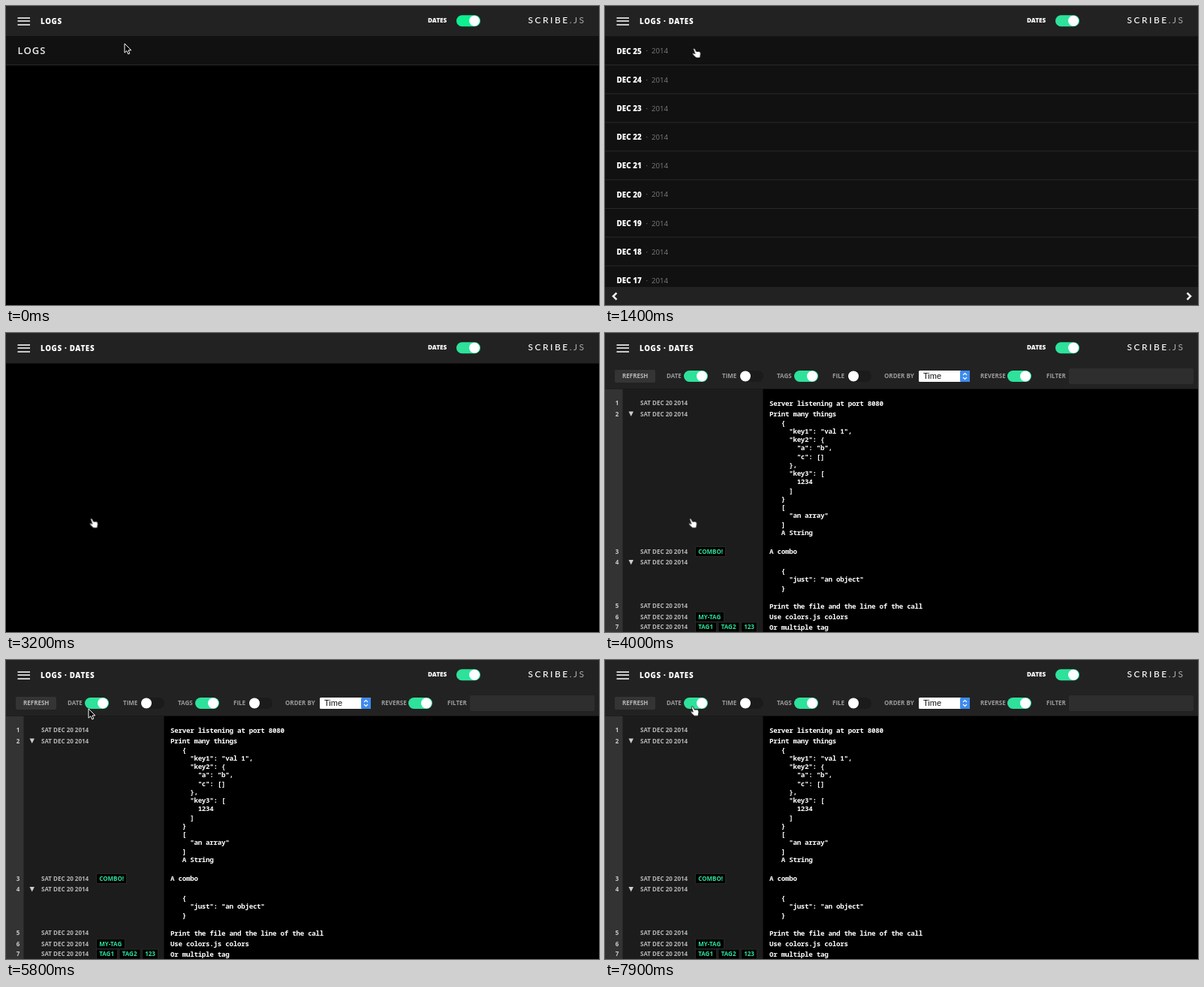
Write an HTML page that moves like this. It is 790 px wide and 398 px high and loops after 8000 ms.

```html
<!DOCTYPE html>
<html lang="en">
<head>
<meta charset="utf-8">
<title>Scribe.js log viewer</title>
<style>
  html, body { margin: 0; width: 100%; height: 100%; overflow: hidden; background: #000; }
  svg { display: block; width: 790px; height: 398px; }
  text { font: 700 8px "Open Sans", "Noto Sans", sans-serif; fill: #9b9b9b; white-space: pre; }
  .title { font-weight: 800; font-size: 9.8px; letter-spacing: .65px; fill: #fff; }
  .switch { font-weight: 800; font-size: 8.2px; fill: #fff; }
  .folder { font-weight: 600; font-size: 13px; letter-spacing: 1.1px; fill: #eee; }
  .day { font-weight: 800; font-size: 9.9px; fill: #fff; }
  .year { font-weight: 400; font-size: 9.7px; fill: #7c7c7c; }
  .brand { font: 500 12px Lato, sans-serif; letter-spacing: 2.5px; fill: #fff; }
  .thin { font-weight: 400; fill: #aaa; }
  .code text { font: 600 9.2px "Noto Sans Mono", monospace; letter-spacing: -.28px; fill: #fff; }
  .num { text-anchor: middle; fill: #ccc; }
  .date { fill: #b4b4b4; }
  .tag text { fill: #2ee29b; }
  .tag rect { fill: #000; stroke: #262626; }
  .option { font: 400 11px "Liberation Sans", Arial, sans-serif; fill: #111; }
  .on { fill: #2ee29b; }
  .off { fill: #1b1b1b; }
  .white { fill: #fff; }
  .panel { fill: #222; }
  .row { fill: #111; }
  .rule { fill: #292929; }
  .chevron { fill: none; stroke: #eee; stroke-width: 2.6; }

  .folders, .dates, .log, .short, .long, .bar, .arrow, .hand, .main-pill,
  .side, .code, .when, .later { animation: 8s step-end infinite; }
  .folders, .short { animation-name: folders; }
  .long { animation-name: long; }
  .dates { animation-name: dates; }
  .log { animation-name: log; }
  .bar { animation-name: bar; }
  .arrow { animation-name: arrow; }
  .hand { animation-name: hand; }
  .main-pill { animation-name: main-pill; }
  .side, .code { animation-name: left; }
  .when { animation-name: when; }
  .later { animation-name: up; }
  .cursor { animation: move 8s infinite; }
  .live circle { animation: knob 8s infinite; }
  .live rect { animation: pill 8s infinite; }

  @keyframes folders { 0% { opacity: 1 } 13.75%, to { opacity: 0 } }
  @keyframes long { 0% { opacity: 0 } 13.75%, to { opacity: 1 } }
  @keyframes dates { 0% { opacity: 0 } 15% { opacity: 1 } 40%, to { opacity: 0 } }
  @keyframes log { 0% { opacity: 0 } 41.25%, to { opacity: 1 } }
  @keyframes main-pill { 0% { fill: #0eef8f } 13.75%, to { fill: #2ee29b } }
  @keyframes arrow { 0%, 51.25% { opacity: 1 } 10%, 77.5%, to { opacity: 0 } }
  @keyframes hand { 0%, 51.25% { opacity: 0 } 10%, 77.5%, to { opacity: 1 } }
  @keyframes bar {
    0%, 13.75% { opacity: 0; transform: none }
    10%, 18.75% { opacity: 1; transform: none }
    21.25% { opacity: 1; transform: translateY(38.2px) }
    22.5% { opacity: 1; transform: translateY(114.6px) }
    23.75% { opacity: 1; transform: translateY(152.8px) }
    25%, 31.25% { opacity: 1; transform: translateY(191px) }
    26.25%, 30% { opacity: 1; transform: translateY(229.2px) }
    27.5% { opacity: 1; transform: translateY(267.4px) }
    40%, to { opacity: 0; transform: none }
  }
  /* date column folded away between 6.6 s and 7.6 s */
  @keyframes left { 0%, 95%, to { transform: none } 82.5% { transform: translateX(-72px) } }
  @keyframes when { 0%, 95%, to { opacity: 1 } 82.5% { opacity: 0 } }
  @keyframes up { 0%, 95%, to { transform: none } 82.5% { transform: translateY(-1px) } }
  @keyframes knob {
    0%, 98.75%, to { transform: none }
    82.5% { transform: none; animation-timing-function: steps(3) }
    86.25% { transform: translateX(-16px) }
    95% { transform: translateX(-16px); animation-timing-function: steps(3) }
  }
  @keyframes pill {
    0%, 98.75%, to { fill: #2ee29b }
    82.5% { fill: #2ee29b; animation-timing-function: steps(3) }
    86.25% { fill: #1b1b1b }
    95% { fill: #1b1b1b; animation-timing-function: steps(3) }
  }
  @keyframes move {
    0% { transform: translate(158px, 50px) }
    8.75% { transform: translate(158px, 50px); animation-timing-function: steps(5) }
    15%, 17.5% { transform: translate(117.5px, 56px); animation-timing-function: steps(2) }
    20% { transform: translate(117px, 64px); animation-timing-function: steps(6) }
    27.5% { transform: translate(115px, 340px); animation-timing-function: steps(3) }
    31.25% { transform: translate(116px, 255px); animation-timing-function: steps(5) }
    37.5% { transform: translate(112.5px, 246.5px) }
    50% { transform: translate(112.5px, 246.5px); animation-timing-function: steps(5) }
    56.25% { transform: translate(70px, 147px); animation-timing-function: steps(7) }
    65% { transform: translate(35px, 112px) }
    66.25% { transform: translate(35px, 112px); animation-timing-function: steps(5) }
    72.5% { transform: translate(110px, 65px); animation-timing-function: steps(4) }
    77.5%, to { transform: translate(115px, 61.5px) }
  }
</style>
</head>
<body>
<svg id="stage" viewBox="0 0 790 398"></svg>
<script>
const text = (x, y, s, cls = "") => `<text class="${cls}" x="${x}" y="${y}" dy=".357em">${s}</text>`;
const rect = (x, y, w, h, cls, r = 0) =>
  `<rect class="${cls}" x="${x}" y="${y}" width="${w}" height="${h}" rx="${r}"/>`;
const group = (cls, ...parts) => `<g class="${cls}">${parts.join("")}</g>`;

const toggle = (x, y, on, cls = "", pill = "") => group(cls,
  rect(x, y - 7.5, 32, 15, pill || (on ? "on" : "off"), 7.5),
  `<circle class="white" cx="${x + (on ? 24 : 8)}" cy="${y}" r="7"/>`);

const header = [
  rect(0, 0, 790, 40.5, "panel"),
  ...[15, 19, 24].map(y => `<rect x="15.5" y="${y}" width="16.5" height="2" fill="#ccc"/>`),
  text(46, 20.5, "LOGS", "title short"),
  text(46, 20.5, "LOGS · DATES", "title long"),
  text(562, 19.5, "DATES", "switch"),
  toggle(600, 19.8, true, "", "main-pill"),
  text(695.5, 19, 'SCRIBE<tspan class="thin">.JS</tspan>', "brand")
].join("");

const folders = group("folders",
  rect(0, 41, 790, 37, "row"), rect(0, 78, 790, 1, "rule"),
  text(15.5, 59, "LOGS", "folder"));

const days = Array.from({ length: 9 }, (_, i) => {
  const y = 41 + 38.2 * i;
  return rect(0, y + 37, 790, 1, "rule") +
    text(15.5, y + 19, `DEC ${25 - i}`, "day") +
    text(54.5, y + 19, "·", "year") + text(62, y + 19, "2014", "year");
});
const dates = group("dates",
  rect(0, 40.5, 790, 340, "row"), ...days,
  rect(0, 374, 790, 24, "panel"),
  '<path class="chevron" d="M15.5 381.8L11 386.3L15.5 390.8M775.5 381.8L780 386.3L775.5 390.8"/>');

const tools = [
  rect(0, 40, 790, 34.5, "panel"),
  '<rect x="13" y="49" width="54" height="17" rx="2" fill="#343434"/>',
  text(23, 57.5, "REFRESH", "date"),
  text(82, 57.5, "DATE"), toggle(105, 57.5, true, "live"),
  text(156, 57.5, "TIME"), toggle(179, 57.5, false),
  text(229, 57.5, "TAGS"), toggle(252, 57.5, true),
  text(303, 57.5, "FILE"), toggle(323, 57.5, false),
  text(372, 57.5, "ORDER BY"),
  rect(418, 50, 68, 15, "white", 1.5),
  '<rect x="473" y="50" width="13" height="15" rx="1.5" fill="#3d8bee"/>',
  '<path fill="none" stroke="#fff" stroke-width="1.2" d="M477 56l2.5-2.5L482 56M477 59l2.5 2.5L482 59"/>',
  text(424, 57.5, "Time", "option"),
  text(500, 57.5, "REVERSE"), toggle(536, 57.5, true),
  text(588, 57.5, "FILTER"),
  '<rect x="618" y="47" width="166" height="21" rx="2" fill="#2e2e2e"/>'
].join("");

const tagWidth = { "COMBO!": 41, "MY-TAG": 39, TAG1: 29, TAG2: 29, 123: 22 };
const things = `Print many things
   {
     "key1": "val 1",
     "key2": {
       "a": "b",
       "c": []
     },
     "key3": [
       1234
     ]
   }
   [
     "an array"
   ]
   A String`;
const entries = [
  [93.5, [], "Server listening at port 8080"],
  [108, [], things],
  [291, ["COMBO!"], "A combo"],
  [305.5, [], '\n   {\n     "just": "an object"\n   }'],
  [363.5, [], "Print the file and the line of the call"],
  [377.7, ["MY-TAG"], "Use colors.js colors"],
  [391.5, ["TAG1", "TAG2", "123"], "Or multiple tag"]
];

const tagBoxes = (tags, y) => {
  let x = 120.5;
  return tags.map(s => {
    const box = rect(x, y - 6.5, tagWidth[s] - 1, 13, "") + text(x + 3.7, y, s);
    x += tagWidth[s] + 1.5;
    return box;
  });
};
const entry = ([y, tags, body], i) => {
  const lines = body.split("\n");
  return group(i ? "later" : "",
    text(16, y, i + 1, "num"),
    lines.length > 1 ? `<path fill="#ccc" d="M31.5 ${y - 3.5}h6.4l-3.2 6.5z"/>` : "",
    group("when", text(47, y, "SAT DEC 20 2014", "date")),
    group("side tag", ...tagBoxes(tags, y)),
    group("code", ...lines.map((s, k) => text(219, y + 11.25 * k, s))));
};
const log = group("log",
  rect(0, 40, 790, 358, ""),
  '<rect class="side" x="-70" y="74.5" width="280.5" height="324" fill="#1c1c1c"/>',
  '<rect y="74.5" width="23.5" height="324" fill="#333"/>',
  tools, ...entries.map(entry));

const cursor = group("cursor",
  '<path class="arrow" fill="#000" stroke="#fff" d="M0 0V12.2L2.9 9.6L4.8 14L6.8 13.1L5 8.9H8.8Z"/>',
  '<path class="hand" fill="#fff" stroke="#000" stroke-width=".8" d="M0 1.2Q1-.5 2.3 .9L4.2 4.6L8 4.4Q9.8 5 10 7.5L9.6 10.2L9 13H4L.2 9.4Q-1.6 7-.3 6.6L2.4 7.6Z"/>');

document.getElementById("stage").innerHTML =
  folders + dates + rect(0, 41, 7, 37, "bar on") + log + header + cursor;
</script>
</body>
</html>
```
